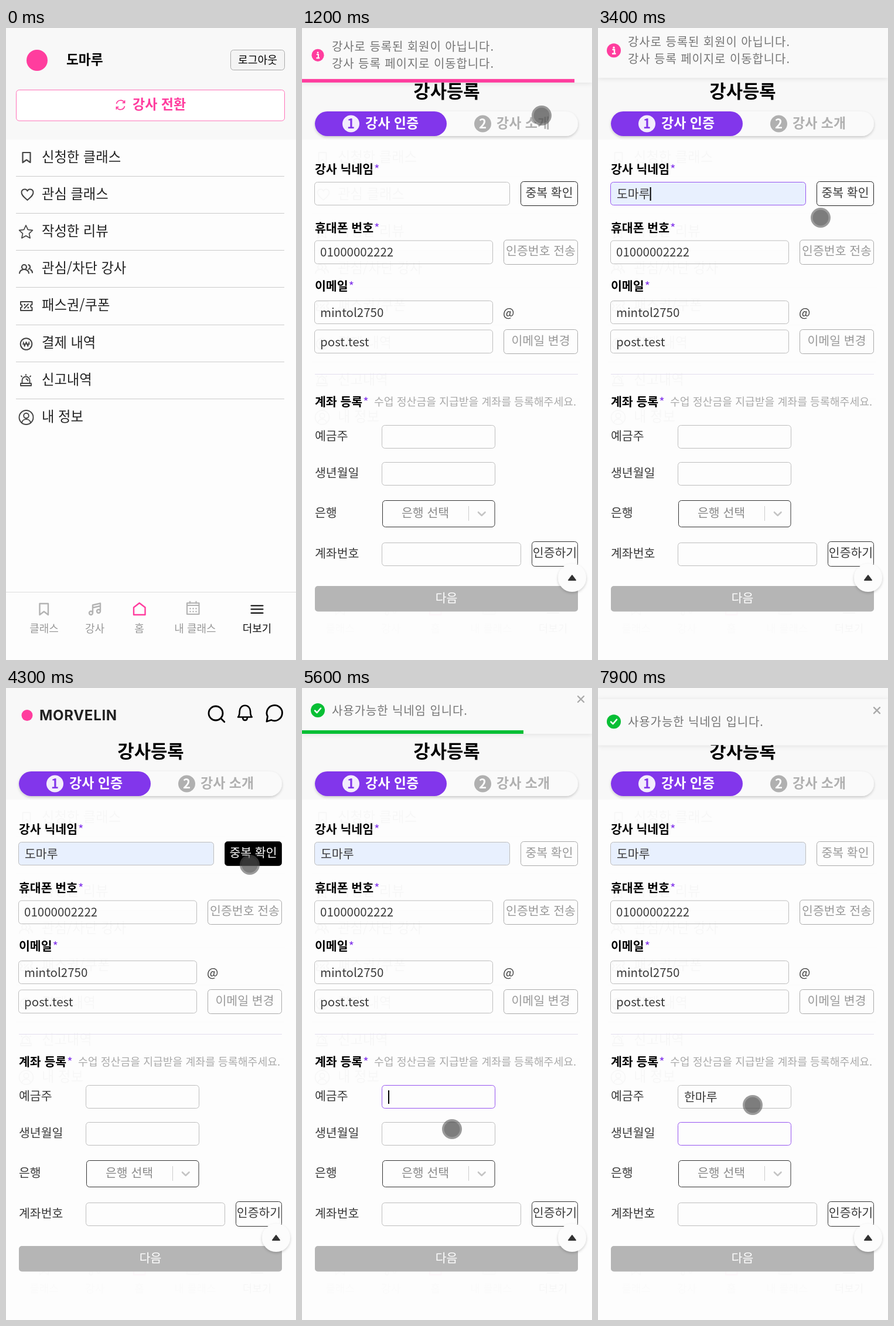
An HTML page that plays this animation: 495x1076 px, repeating every 8 s.

```html
<!DOCTYPE html>
<html lang="ko">
<head>
<meta charset="utf-8">
<style>
html, body { margin: 0; width: 100%; height: 100%; overflow: hidden; background: #fdfdfd; }
svg { display: block; width: 495px; height: 1076px; }
text { font-family: "Noto Sans CJK KR", "Noto Sans CJK", "Noto Sans CJK JP", sans-serif; white-space: pre; }
</style>
</head>
<body>
<svg id="stage" viewBox="0 0 495 1076" xmlns="http://www.w3.org/2000/svg"></svg>
<script>
const LOOP = 8000, STEP = 100;
const PINK = '#ff3d9e', PURPLE = '#8236eb', FOCUS = '#9654f0', GREEN = '#08bf35', INK = '#3a3a3a';
const NICK = '도마루', OWNER = ['', 'ㅎ', '하', '한', '한ㅁ', '한마', '한말', '한마루'];

// --- markup helpers ---
const text = (x, cy, size, str, fill = '#111', weight = 350, extra = '') =>
  `<text x="${x}" y="${cy + size * .375}" font-size="${size}" fill="${fill}" font-weight="${weight}" ${extra}>${str}</text>`;
const mid = 'text-anchor="middle"';
const box = (x1, y1, x2, y2, stroke = '#bdbdbd', fill = 'none', id = '') =>
  `<rect id="${id}" x="${x1}" y="${y1}" width="${x2 - x1}" height="${y2 - y1}" rx="5" fill="${fill}" stroke="${stroke}"/>`;
const line = (x1, x2, y, color) => `<path d="M${x1} ${y}H${x2}" stroke="${color}"/>`;
const icon = (d, stroke, width = 2, fill = 'none') =>
  `<path d="${d}" fill="${fill}" stroke="${stroke}" stroke-width="${width}" stroke-linecap="round" stroke-linejoin="round"/>`;
const ring = (x, y, r) => `M${x - r} ${y}a${r} ${r} 0 1 0 ${2 * r} 0a${r} ${r} 0 1 0 ${-2 * r} 0z`;
const dot = (x, y, r, fill, extra = '') => `<circle cx="${x}" cy="${y}" r="${r}" fill="${fill}" ${extra}/>`;
const group = (id, body) => `<g id="${id}">${body}</g>`;
const shadow = (id, dy, blur, alpha) =>
  `<filter id="${id}" x="-20%" y="-30%" width="140%" height="170%"><feDropShadow dx="0" dy="${dy}" stdDeviation="${blur}" flood-opacity="${alpha}"/></filter>`;

function starPath(x, y, r) {
  const pts = Array.from({ length: 10 }, (_, i) => {
    const a = -Math.PI / 2 + i * Math.PI / 5, q = i % 2 ? r * .48 : r;
    return (x + q * Math.cos(a)).toFixed(1) + ' ' + (y + q * Math.sin(a)).toFixed(1);
  });
  return 'M' + pts.join('L') + 'z';
}

// --- menu page ---
function menuHead() {
  return dot(53, 55, 18, PINK) + text(103, 53, 22.7, NICK, '#000', 700) +
    box(383.5, 37.5, 475.5, 71.5, '#aaa', '#f4f4f4') + text(429.5, 54, 18.2, '로그아웃', '#000', 400, mid) +
    box(17.5, 105.5, 475.5, 158, '#ff72b8', '#fff', 'switchBox') +
    group('switchInk', '<path d="M188.5 129a7.3 7.3 0 0 1 13.5-2.2m.6-3.5v4h-4M202.5 133a7.3 7.3 0 0 1-13.5 2.2m-.6 3.5v-4h4" fill="none" stroke="currentColor" stroke-width="1.7"/>' +
      text(216, 129, 23, '강사 전환', 'currentColor', 700));
}

function menuList() {
  const ink = '#444';
  const rows = ['신청한 클래스', '관심 클래스', '작성한 리뷰', '관심/차단 강사', '패스권/쿠폰', '결제 내역', '신고내역', '내 정보'];
  const labels = rows.map((s, i) => text(61, 219 + 63.17 * i, 23.3, s, '#222', 300) +
    (i ? line(17, 475, Math.floor(189.3 + 63.17 * i) + .5, '#cbcbcb') : '')).join('');
  return labels +
    icon('M28.5 212h13v17l-6.5-4.5-6.5 4.5z', ink, 2.2) +
    icon('M36.5 293C31 288 26.5 285 26.5 280a5.3 5.3 0 0 1 10-2.5a5.3 5.3 0 0 1 10 2.5c0 5-4.5 8-10 13z', ink) +
    icon(starPath(34, 348, 12), ink, 1.7) +
    icon(ring(31, 407, 4) + 'M23 417.5a8 6.5 0 0 1 16 0M38.5 403.2a4 4 0 0 1 0 7.5M42 411.5q3 2 3 5', ink, 2.2) +
    icon('M25 466h19.5v5a2.5 2.5 0 0 0 0 5v5H25v-5a2.5 2.5 0 0 0 0-5zM31.5 477l6.5-7', ink) +
    dot(31.8, 471, 1.5, ink) + dot(37.8, 476, 1.5, ink) +
    icon(ring(34.5, 538, 9.8), ink) +
    icon('M29.5 534.5l2.2 7.5 2.8-7.5 2.8 7.5 2.2-7.5M28.5 538h12', ink, 1.6) +
    icon('M25 605h18v4H25zM27.5 605v-5a6.5 6.5 0 0 1 13 0v5M34 590v1M26 592.5l1 1M42 592.5l-1 1M34.5 597.5q2.5.5 2.7 3', ink, 1.9) +
    icon(ring(34.5, 663, 12) + ring(34.5, 660, 4.3) + 'M27 672a7.6 7 0 0 1 15 0', ink, 1.9);
}

function menuNav() {
  const gray = '#b3b3b3', names = ['클래스', '강사', '홈', '내 클래스', '더보기'], xs = [65, 151.5, 227.5, 323, 428.5];
  const dots = [0, 1, 2, 3, 4, 5].map(i => dot(314.5 + (i % 3) * 5, i < 3 ? 988.5 : 993.5, 1.3, gray)).join('');
  return line(0, 495, 960.5, '#dedede') +
    icon('M57.5 980h14.5v19l-7.2-5.5-7.3 5.5z', gray, 2.4) +
    icon(ring(145, 996, 3) + ring(158, 993, 3) + 'M148 996V982.5l13-3V993M148 987l13-3', gray, 2.4) +
    icon('M218 986.5l9.7-7.5 9.8 7.5V999H218z', PINK, 2.4) +
    icon('M309 979h20.5v19H309zM309 983h20.5M314 976.5v3M324.5 976.5v3', gray, 2.2) + dots +
    icon('M418.5 983.5h20M418.5 989.5h20M418.5 996h20', '#000', 2.2) +
    names.map((s, i) => text(xs[i], 1022, 18, s, i === 4 ? '#111' : '#999', 350, mid)).join('');
}

// --- form page ---
const FS = 20.5;
const label = (cy, s) => text(22, cy, FS, `${s}<tspan fill="${PURPLE}" font-weight="400" dx="1">*</tspan>`, '#000', 600);
const caption = (cy, s) => text(22, cy, FS, s, INK);
const button = (x1, y1, x2, y2, s, stroke, ink) =>
  box(x1, y1, x2, y2, stroke) + text((x1 + x2) / 2, (y1 + y2) / 2 - 2, FS, s, ink, 350, mid);

function form() {
  const g = '#aaa', t = '#999';
  return text(247, 107, 30.8, '강사등록', '#000', 700, mid) +
    `<rect x="22" y="142" width="449" height="42" rx="21" fill="#fafafa" filter="url(#soft)"/>
     <rect x="22" y="142" width="225" height="42" rx="21" fill="${PURPLE}"/>` +
    dot(83.5, 163, 14.5, '#f3edfc') + text(83.5, 163, 22, '1', PURPLE, 700, mid) + text(108, 161, 23, '강사 인증', '#fff', 700) +
    dot(308.5, 163, 14.5, '#b0b0b0') + text(308.5, 163, 22, '2', '#fff', 700, mid) + text(332, 161, 23, '강사 소개', '#b0b0b0', 700) +
    label(240, '강사 닉네임') + box(21.5, 262.5, 354.5, 301.5, '', 'none', 'nickBox') +
    text(32, 282, FS, NICK, INK, 350, 'id="nick"') +
    box(373.5, 261.5, 470.5, 302.5, '', 'none', 'checkBox') + text(422, 280, FS, '중복 확인', '', 350, mid + ' id="check"') +
    label(340, '휴대폰 번호') + box(21.5, 362, 325.5, 401.5) + text(31, 381, FS, '01000002222', INK) +
    button(344.5, 361, 470.5, 402.5, '인증번호 전송', g, t) +
    label(439, '이메일') + box(21.5, 464.5, 325.5, 503.5) + text(31, 484, FS, 'mintol2750', INK) + text(343, 484, FS, '@', INK) +
    box(21.5, 514, 325.5, 553.5) + text(31, 534, FS, 'post.test', INK) +
    button(344.5, 513.5, 470.5, 554.5, '이메일 변경', g, t) +
    line(22, 471, 589.5, '#e2ddee') + label(636, '계좌 등록') +
    text(123, 636.5, 18.3, '수업 정산금을 지급받을 계좌를 등록해주세요.', '#aaa') +
    caption(694, '예금주') + box(136.5, 676.5, 329.5, 715.5, '', 'none', 'ownerBox') + text(147, 696.5, FS, '', INK, 350, 'id="owner"') +
    caption(757.5, '생년월일') + box(136.5, 739.5, 329.5, 778.5, '', 'none', 'birthBox') +
    caption(825, '은행') + box(137.5, 804.5, 329, 849.5, '#333') + text(170, 825, FS, '은행 선택', '#8a8a8a') +
    '<path d="M284.5 814v25" stroke="#ccc"/>' + icon('M301 824.5l5.7 5.5 5.8-5.5', '#c4c4c4', 2.6) +
    caption(894, '계좌번호') + box(136.5, 876.5, 373.5, 915.5) +
    button(392.5, 874.5, 470.5, 916.5, '인증하기', '#333', INK) +
    '<rect x="22" y="950" width="449" height="43.5" rx="5" fill="#b5b5b5"/>' + text(246.5, 970, FS, '다음', '#fff', 350, mid) +
    dot(461, 936, 24, '#fcfcfc', 'filter="url(#soft)"') + icon('M455 940l6-8 6 8z', '#333', 2, '#333') +
    '<rect id="caret" width="2" height="23" fill="#000"/>';
}

function header() {
  return dot(36, 46.5, 9.5, PINK) +
    '<text x="57" y="55" font-size="24" font-weight="700" fill="#222" letter-spacing=".7" style="font-family:Inter,sans-serif">MORVELIN</text>' +
    icon(ring(358, 43, 12) + 'M366.8 51.8l6 6', '#000', 2.8) +
    icon('M396 49.5c2.5-2 2.7-6 2.7-10a9.2 9.7 0 0 1 18.4 0c0 4 .2 8 2.7 10zM404 50q.5 5 4 5t4-5', '#000', 2.6) +
    icon('M445 57l1.5-8.5a13.2 13.2 0 1 1 6.2 6z', '#000', 2.8);
}

function popup() {
  return '<path filter="url(#soft)" fill="#fcfcfc" d="M184 390h9l14-11 14 11h181q8 0 8 8v50q0 8-8 8H184q-8 0-8-8v-50q0-8 8-8z"/>' +
    text(194, 423, FS, NICK, INK);
}

function toast(id, h, color, mark, lines) {
  return group(id, `<rect width="495" height="${h}" fill="#f9f9f9" filter="url(#wide)"/>` +
    `<rect id="${id}Bar" y="${h - 6}" height="6" fill="${color}"/>` +
    group(id + 'Icon', dot(0, 0, 12, color) + mark) +
    lines.map(([cy, s]) => text(51, cy, 20, s, '#757575', 350, 'letter-spacing=".9"')).join(''));
}

const stage = document.getElementById('stage');
stage.innerHTML =
  `<defs>${shadow('soft', 2, 2.2, .2)}${shadow('wide', 1, 4, .1)}</defs>
   <rect width="495" height="1076" fill="#fdfdfd"/><rect width="495" height="190" fill="#f8f8f8"/>` +
  group('menuTop', menuHead()) + group('menu', menuList() + menuNav()) +
  group('page', form() + group('top', header()) + group('popup', popup())) +
  toast('info', 92, PINK, dot(0, -5, 1.7, '#fff') + '<path d="M-2.5-1.5H1V5M-3 5.5H3.5" fill="none" stroke="#fff" stroke-width="2.4"/>',
    [[31, '강사로 등록된 회원이 아닙니다.'], [60, '강사 등록 페이지로 이동합니다.']]) +
  toast('done', 78, GREEN, icon('M-5 .5l3.5 3.5 6.5-7.5', '#fff', 2.5) + icon('M444 -24l10 10M454 -24l-10 10', '#aaa', 2.4),
    [[38, '사용가능한 닉네임 입니다.']]) +
  group('pointer', dot(0, 0, 17, '#555', 'opacity=".58"') + dot(0, 0, 13.5, '#444', 'opacity=".35"'));

const el = {};
stage.querySelectorAll('[id]').forEach(n => { if (n.id) el[n.id] = n; });

// --- motion helpers ---
function bezier(x1, y1, x2, y2) {
  const f = (a, b, s) => 3 * a * s * (1 - s) ** 2 + 3 * b * s * s * (1 - s) + s ** 3;
  return p => {
    let lo = 0, hi = 1;
    for (let i = 0; i < 24; i++) {
      const m = (lo + hi) / 2;
      if (f(x1, x2, m) < p) lo = m; else hi = m;
    }
    return f(y1, y2, lo);
  };
}
const linear = p => p;

// keys: rows of [time, value...]
function track(keys, t, ease = linear) {
  if (t <= keys[0][0]) return keys[0].slice(1);
  for (let i = 1; i < keys.length; i++) {
    const a = keys[i - 1], b = keys[i];
    if (t < b[0]) {
      const p = ease((t - a[0]) / (b[0] - a[0]));
      return a.slice(1).map((v, k) => v + (b[k + 1] - v) * p);
    }
  }
  return keys[keys.length - 1].slice(1);
}

const easeIn = bezier(.215, .61, .355, 1), easeOut = bezier(.25, .1, .25, 1);
const BOUNCE_IN = [[0, -3000], [.6, 25], [.75, -10], [.9, 5], [1, 0]];
const BOUNCE_OUT = [[0, 0], [.2, -10], [.4, 20], [.45, 20], [1, -2000]];
const toastY = (t, enter, leave) => t < leave
  ? track(BOUNCE_IN, (t - enter) / 700, easeIn)[0]
  : track(BOUNCE_OUT, (t - leave) / 700, easeOut)[0];

const PATH = [
  [100, 411, 142], [400, 411, 142], [500, 410, 148], [800, 410, 148], [900, 409, 149], [1500, 409, 149],
  [1900, 284, 228], [2000, 262, 245], [2200, 229, 299], [2500, 229, 299], [2600, 228, 320], [2800, 226, 415],
  [3000, 226, 420], [3200, 352, 346], [3400, 380, 323], [3600, 390, 318], [4000, 416, 301], [4400, 416, 301],
  [4500, 410, 418], [4800, 410, 418], [5000, 366, 606], [5100, 300, 645], [5200, 260, 693], [5400, 250, 715],
  [5500, 256, 751], [7300, 256, 751], [7700, 263, 714], [7900, 264, 710]
];

const show = (n, on) => n.style.display = on ? '' : 'none';
const set = (n, attrs) => { for (const k in attrs) n.setAttribute(k, attrs[k]); };

function setToast(id, y, iconY, scale, bar, on) {
  show(el[id], on && y > -100);
  set(el[id], { transform: `translate(0 ${y})` });
  set(el[id + 'Icon'], { transform: `translate(27 ${iconY}) scale(${scale})` });
  set(el[id + 'Bar'], { width: Math.max(0, bar) });
}

function draw(time) {
  const t = Math.floor(time / STEP) * STEP;
  const within = (a, b) => t >= a && t < b;
  const opened = t >= 1100;

  show(el.menuTop, !opened);
  show(el.page, opened);
  el.menu.style.opacity = opened ? .025 : 1;

  const pressed = within(500, 1100);
  set(el.switchBox, { fill: pressed ? PINK : '#fff' });
  el.switchInk.style.color = pressed ? '#fff' : PINK;

  // nickname field and its check button
  const filled = t >= 3000, nickFocus = within(2100, 4200);
  set(el.nickBox, { stroke: nickFocus ? FOCUS : '#bdbdbd', fill: filled ? '#e8f0fe' : 'none' });
  show(el.nick, filled);
  show(el.popup, within(2200, 3000));
  const held = within(4200, 4500), used = t >= 4700;
  set(el.checkBox, { fill: held ? '#000' : 'none', stroke: used ? '#aaa' : '#222' });
  set(el.check, { fill: held ? '#fff' : used ? '#999' : INK });

  // account fields
  const ownerFocus = within(5300, 7100), birthFocus = t >= 7100;
  const typed = Math.max(0, Math.min(OWNER.length - 1, Math.floor((t - 5700) / 150)));
  el.owner.textContent = OWNER[typed];
  set(el.ownerBox, { stroke: ownerFocus ? FOCUS : '#bdbdbd' });
  set(el.birthBox, { stroke: birthFocus ? FOCUS : '#bdbdbd' });

  let caret = null;
  if (nickFocus) caret = filled ? [32 + el.nick.getComputedTextLength(), 271, 3000] : [31.5, 271, 2100];
  else if (ownerFocus) caret = [147 + (typed ? el.owner.getComputedTextLength() : 0), 685, 5300];
  else if (birthFocus) caret = [147, 748, 7100];
  show(el.caret, caret && Math.floor((t - caret[2]) / 500) % 2 === 0);
  if (caret) set(el.caret, { x: caret[0], y: caret[1] });

  // toasts
  const infoY = opened ? toastY(t, 640, 3340) : -58;
  setToast('info', infoY, 45.5, t <= 1200 ? .88 : 1, opened ? 495 - .22 * (t - 1064) : 0, within(900, 4100));
  setToast('done', toastY(t, 4540, 7650), 38, 1, 378 - .1818 * (t - 5600), t >= 4700);
  show(el.top, t >= 3500 && t < 4900);

  const [px, py] = track(PATH, t);
  show(el.pointer, t >= 100);
  set(el.pointer, { transform: `translate(${px} ${py})` });
}

const start = performance.now();
function tick() {
  draw((performance.now() - start) % LOOP);
  requestAnimationFrame(tick);
}
tick();
</script>
</body>
</html>
```
